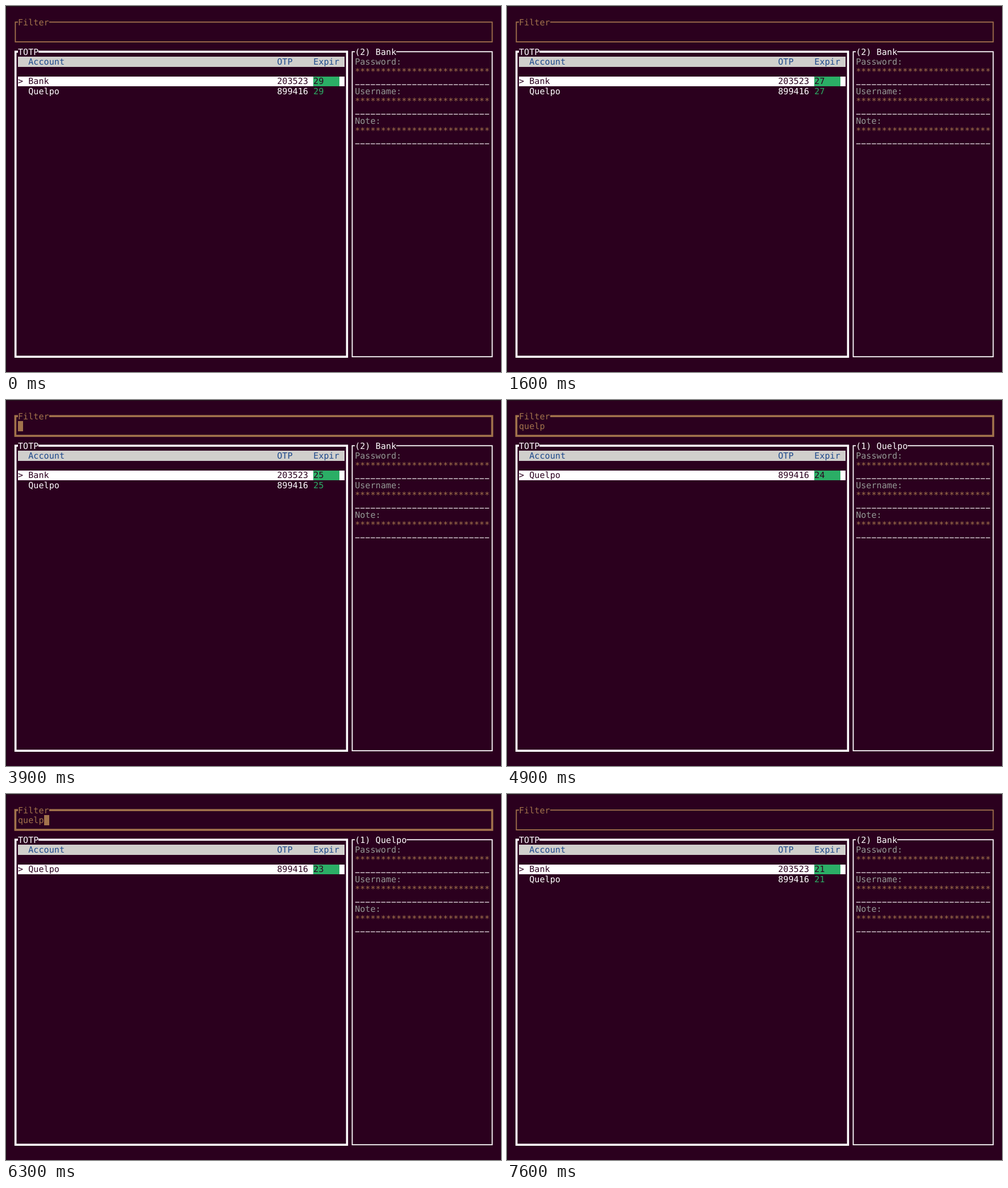
Recreate the animation shown at these times as an HTML page. Size 870 px wide and 643 px high, loop 8000 ms.

```html
<!DOCTYPE html>
<html lang="en">
<head>
<meta charset="utf-8">
<title>TOTP list</title>
<style>
  html, body { margin: 0; width: 100%; height: 100%; overflow: hidden; background: #2b001e; }
  svg { display: block; width: 870px; height: 643px; }
  text {
    font: 15px "DejaVu Sans Mono", monospace;
    letter-spacing: 0.08px;
    white-space: pre;
    text-rendering: geometricPrecision;
  }
</style>
</head>
<body>
<svg id="stage" viewBox="0 0 870 643"></svg>
<script>
const BG = '#2b001e', WHITE = '#ffffff', BROWN = '#a2734c', GREEN = '#2bae66';
const GREY = '#d0cfcc', BLUE = '#1f4a8c', DIM = '#959a96';
const CW = 9.11, RH = 17.31, X0 = 21, Y0 = 20, LOOP = 8000;
const svg = document.getElementById('stage');

const x = col => X0 + col * CW;
const y = row => Y0 + row * RH;

function add(tag, attrs) {
  const el = document.createElementNS('http://www.w3.org/2000/svg', tag);
  for (const key in attrs) el.setAttribute(key, attrs[key]);
  return svg.appendChild(el);
}

function rect(left, top, width, height, fill) {
  return add('rect', { x: left, y: top, width, height, fill });
}

// Fills terminal cells, snapped to whole pixels.
function cells(col, row, count, fill) {
  const left = Math.round(x(col)), top = Math.round(y(row));
  return rect(left, top, Math.round(x(col + count)) - left, Math.round(y(row + 1)) - top, fill);
}

function text(col, row, str, fill) {
  const el = add('text', { x: x(col), y: y(row) + 13.6, fill });
  el.textContent = str;
  return el;
}

function frame(left, top, right, bottom, color, weight) {
  return add('rect', {
    x: left, y: top, width: right - left, height: bottom - top,
    fill: 'none', stroke: color, 'stroke-width': weight
  });
}

function show(el, on) {
  el.setAttribute('visibility', on ? 'visible' : 'hidden');
}

rect(0, 0, 870, 1, '#201c1d');
rect(0, 0, 1, 643, '#1b0a15');

// Filter box
const filterBox = frame(16.4, 28.3, 854.5, 63, BROWN, 1.8);
cells(0, 0, 6, BG);
text(0, 0, 'Filter', BROWN);
const query = text(0, 1, '', BROWN);
const cursor = cells(0, 1, 1, BROWN);

// Account table
frame(16.7, 80.3, 599.4, 616.2, WHITE, 3.6);
cells(0, 3, 4, BG);
text(0, 3, 'TOTP', WHITE);
cells(0, 4, 63, GREY);
text(2, 4, 'Account', BLUE);
text(50, 4, 'OTP', BLUE);
text(57, 4, 'Expir', BLUE);
cells(0, 6, 63, WHITE);
cells(57, 6, 5, GREEN);
text(0, 6, '>', BG);

function tableRow(row, color, timerColor) {
  return [text(2, row, '', color), text(50, row, '', color), text(57, row, '', timerColor)];
}
const rows = [tableRow(6, BG, BG), tableRow(7, WHITE, GREEN)];

// Details
frame(608.5, 80.3, 854.5, 616.2, WHITE, 1.8);
const titleGap = cells(65, 3, 8, BG);
const title = text(65, 3, '', WHITE);
['Password:', 'Username:', 'Note:'].forEach((label, i) => {
  const row = 4 + i * 3;
  text(65, row, label, DIM);
  text(65, row + 1, '*'.repeat(26), BROWN);
  for (let c = 0; c < 26; c++) rect(x(65 + c) + 0.6, y(row + 2) + 13.7, 7.6, 1.3, '#e6e0e4');
});

const accounts = [['Bank', '203523'], ['Quelpo', '899416']];
const WORD = 'quelp';

// Each table: [start in ms, value]
const ticks = [0, 600, 1600, 2700, 3600, 4700, 5600, 6600, 7600];
const typed = [[0, 0], [4000, 1], [4100, 3], [4300, 4], [4400, 5],
  [6600, 4], [6800, 3], [7000, 2], [7200, 1], [7300, 0]];
const blink = [[0, 0], [3100, 1], [3700, 0], [3900, 1], [4900, 0], [5100, 1],
  [5700, 0], [6300, 1], [7600, 0]];

const at = (table, t) => table.filter(step => step[0] <= t).pop()[1];

function render(t) {
  const left = String(30 - ticks.filter(start => start <= t).length);
  const count = at(typed, t);
  const focused = t >= 3100 && t < 7600;
  const needle = WORD.slice(0, count);
  const found = accounts.filter(([name]) => name.toLowerCase().includes(needle));

  filterBox.setAttribute('stroke-width', focused ? 3.6 : 1.8);
  query.textContent = needle;
  cursor.setAttribute('x', Math.round(x(count)));
  show(cursor, at(blink, t));

  rows.forEach((row, i) => {
    const values = found[i] ? [...found[i], left] : ['', '', ''];
    row.forEach((el, k) => { el.textContent = values[k]; });
  });

  const heading = `(${found.length}) ${found[0][0]}`;
  title.textContent = heading;
  titleGap.setAttribute('width', heading.length * CW);
}

const begin = performance.now();
function loop() {
  render((performance.now() - begin) % LOOP);
  requestAnimationFrame(loop);
}
loop();
</script>
</body>
</html>
```
